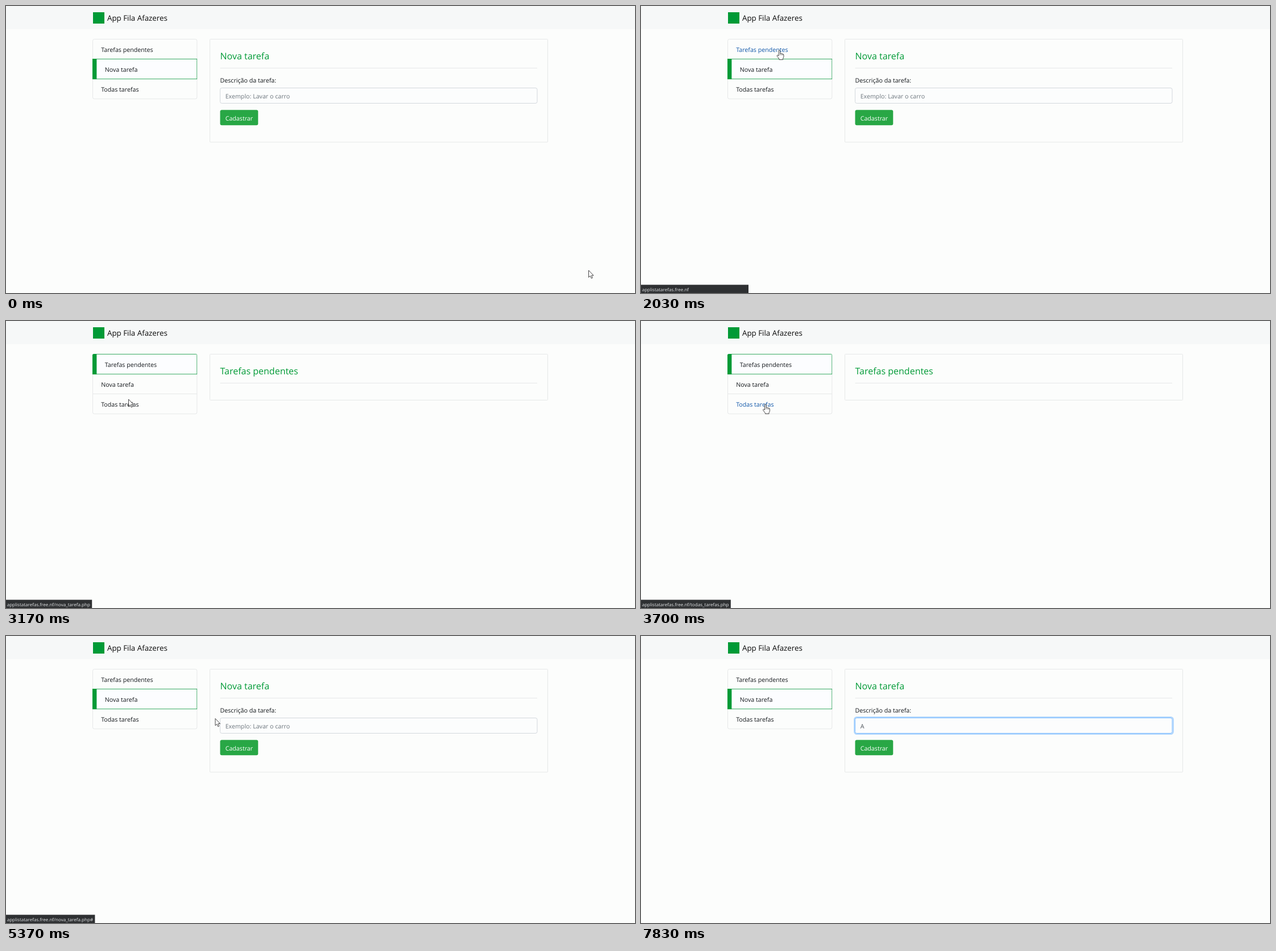
An HTML page that plays this animation: 1106 px wide and 506 px high, repeating every 8000 ms.

```html
<!DOCTYPE html>
<html lang="pt-BR">
<head>
<meta charset="utf-8">
<title>App Fila Afazeres</title>
<style>
  html, body { margin: 0; width: 100%; height: 100%; overflow: hidden; background: #fcfdfc; }
  svg { display: block; width: 100%; height: 100%; }
  text {
    font: 10.67px "Open Sans", "Noto Sans", sans-serif;
    fill: #14181c;
    text-rendering: geometricPrecision;
    white-space: pre;
  }
  .line { fill: none; stroke: #e6e8e8; }
  .brand { font-size: 13.34px; fill: #0c0c0c; }
  #heading { font-size: 16px; fill: #009a36; }
  #activeBox { fill: #fcfdff; stroke: #0a9a3f; stroke-width: .8; }
  #activeBar { fill: #009a36; }
  #field { fill: #fcfdfd; stroke: #d3d8dd; }
  #ring { fill: none; stroke: #007bff; stroke-width: 2.4; }
  #value { fill: #6c757d; }
  #status rect { fill: #2e3032; }
  #status text { font-size: 8.05px; fill: #e4e6e8; }
  #cursor path { fill: #fff; stroke: #333; stroke-width: .9; stroke-linejoin: round; }
</style>
</head>
<body>
<svg viewBox="0 0 1106 506">
  <clipPath id="listShape"><rect x="152" y="58" width="184.3" height="106.2" rx="3"/></clipPath>
  <rect width="1106" height="40.5" fill="#f6f8f8"/>
  <rect x="153" y="11" width="20" height="20" fill="#009a36"/>
  <text class="brand" x="178" y="26">App Fila Afazeres</text>

  <rect class="line" x="152.5" y="58.5" width="183.3" height="105.3" rx="3"/>
  <path class="line" d="M153 93.5H336M153 128.5H336"/>
  <g clip-path="url(#listShape)">
    <rect id="activeBox" x="152.5" width="183.3" height="35.2"/>
    <rect id="activeBar" x="152" width="7.4" height="36"/>
  </g>
  <g id="menu">
    <text y="81">Tarefas pendentes</text>
    <text y="116">Nova tarefa</text>
    <text y="151">Todas tarefas</text>
  </g>

  <rect class="line" id="panel" x="358.5" y="58.5" width="594" rx="1"/>
  <text id="heading" x="376.5" y="94"></text>
  <path class="line" d="M376.5 109.5H934"/>
  <g id="form">
    <text x="376.5" y="135">Descrição da tarefa:</text>
    <rect id="ring" x="375.3" y="143.3" width="560.4" height="29.4" rx="4"/>
    <rect id="field" x="376.5" y="144.5" width="557.5" height="27" rx="3"/>
    <text id="value" x="385.7" y="163"></text>
    <path id="caret" d="M386 151V166" stroke="#333"/>
    <rect id="button" x="376.5" y="183.2" width="66.8" height="27" rx="3"/>
    <text x="385.7" y="202" style="fill:#fff">Cadastrar</text>
  </g>

  <g id="status">
    <rect y="491.5" height="14.5"/>
    <text x="1.7" y="503"></text>
  </g>

  <g id="cursor">
    <path id="arrow" d="M0 0V12.4L2.8 9.8L4.8 14.2L6.8 13.3L4.9 9.1H8.6Z"/>
    <g id="hand">
      <path d="M-1.4 1.2Q-1.4 0 -.2 0T1.1 1.2V5.8Q2.3 4.8 3.4 6Q4.8 5.4 5.6 6.8Q7.4 6.4 7.4 8.4V11.5Q7.2 13.2 6 14.4V16.6H-.6V15.2L-4.2 10.4Q-4.8 8.8 -3.4 8.6Q-2.4 8.6 -1.4 10Z"/>
      <path d="M1.1 6V8.6M3.4 6.4V8.8M5.6 7V9" style="stroke-width:.7"/>
    </g>
    <path id="beam" d="M-2.5 -7.5H2.5M0 -7.5V7.5M-2.5 7.5H2.5"/>
  </g>
</svg>
<script>
const LOOP = 8000;
const FOCUS = 5800, TYPED = 7800;
const HOVER_DELAY = 60, STATUS_DELAY = 200;
const PENDING = 0, NEW = 1, ALL = 2;

const $ = id => document.getElementById(id);
const clamp = v => Math.max(0, Math.min(1, v));
const show = (el, visible) => el.style.display = visible ? '' : 'none';

const menu = [...$('menu').children];
const [statusBox, statusText] = $('status').children;
const host = 'applistatarefas.free.nf';
const links = ['', '/nova_tarefa.php', '/todas_tarefas.php'];

const home = [1024.5, 466];
const moves = [
  { from: 30, to: 370, at: [641, 315] },
  { from: 530, to: 900, at: [405.5, 179.5] },
  { from: 900, to: 1330, at: [255, 66] },
  { from: 1370, to: 1700, at: [243.5, 78] },
  { from: 2500, to: 3170, at: [215.5, 138] },
  { from: 3170, to: 3670, at: [219, 147] },
  { from: 4050, to: 4500, at: [212.5, 117.5] },
  { from: 5160, to: 5370, at: [368, 145.5] },
  { from: 5370, to: 5770, at: [460, 162] },
  { from: 5850, to: 6030, at: [466, 200] }
];

function pointerAt(t) {
  let [x, y] = home;
  for (const { from, to, at } of moves) {
    const k = clamp((t - from) / (to - from));
    x += (at[0] - x) * k;
    y += (at[1] - y) * k;
  }
  return [x, y];
}

function pageAt(t) {
  if (t < 2200 || t >= 5060) return NEW;
  return t < 4130 ? PENDING : ALL;
}

const inside = ([x, y], left, top, right, bottom) =>
  x > left && x < right && y > top && y < bottom;

function linkUnder(point) {
  return menu.findIndex(item => {
    const left = +item.getAttribute('x'), base = +item.getAttribute('y');
    return inside(point, left, base - 11, left + item.getComputedTextLength(), base + 5);
  });
}

const overButton = point => inside(point, 376, 178, 443, 210);
const overField = point => inside(point, 376, 144, 934, 172);

function drawPage(page) {
  const top = 58.5 + 35 * page;
  $('activeBox').setAttribute('y', top);
  $('activeBar').setAttribute('y', top - 0.4);
  menu.forEach((item, i) => item.setAttribute('x', i === page ? 173.7 : 167.2));
  $('panel').setAttribute('height', page === NEW ? 181.5 : 81);
  $('heading').textContent = menu[page].textContent;
  show($('form'), page === NEW);
}

function drawForm(t) {
  const focus = clamp((t - FOCUS) / 150);
  const typed = t >= TYPED;
  $('ring').style.opacity = focus * 0.3;
  $('field').style.stroke = focus ? `color-mix(in srgb, #80bdff ${focus * 100}%, #d3d8dd)` : '';
  $('value').textContent = typed ? 'A' : 'Exemplo: Lavar o carro';
  $('value').style.fill = typed ? '#495057' : '';
  show($('caret'), t >= FOCUS && !typed && (t - 5770) % 1000 < 480);
}

function drawHover(point) {
  const link = linkUnder(point);
  menu.forEach((item, i) => item.style.fill = i === link ? '#0f56a8' : '');
  $('button').style.fill = overButton(point) ? '#218838' : '#28a745';
}

function drawStatus(point, page) {
  const link = linkUnder(point);
  show($('status'), link >= 0);
  if (link < 0) return;
  const tail = links[link] + (link === page ? '#' : '');
  statusText.textContent = host + tail;
  statusBox.setAttribute('width', tail ? statusText.getComputedTextLength() + 5 : 189);
}

function drawPointer(point, page, visible) {
  const onForm = page === NEW;
  const hand = linkUnder(point) >= 0 || (onForm && overButton(point));
  const beam = onForm && overField(point);
  show($('cursor'), visible);
  show($('hand'), hand);
  show($('beam'), beam);
  show($('arrow'), !hand && !beam);
  $('cursor').setAttribute('transform', `translate(${point})`);
}

function draw(t) {
  const page = pageAt(t);
  drawPage(page);
  drawForm(t);
  drawHover(pointerAt(t - HOVER_DELAY));
  drawStatus(pointerAt(t - STATUS_DELAY), page);
  drawPointer(pointerAt(t), page, t < TYPED);
}

let start;
function tick(now) {
  start ??= now;
  draw((now - start) % LOOP);
  requestAnimationFrame(tick);
}
draw(0);
requestAnimationFrame(tick);
</script>
</body>
</html>
```
